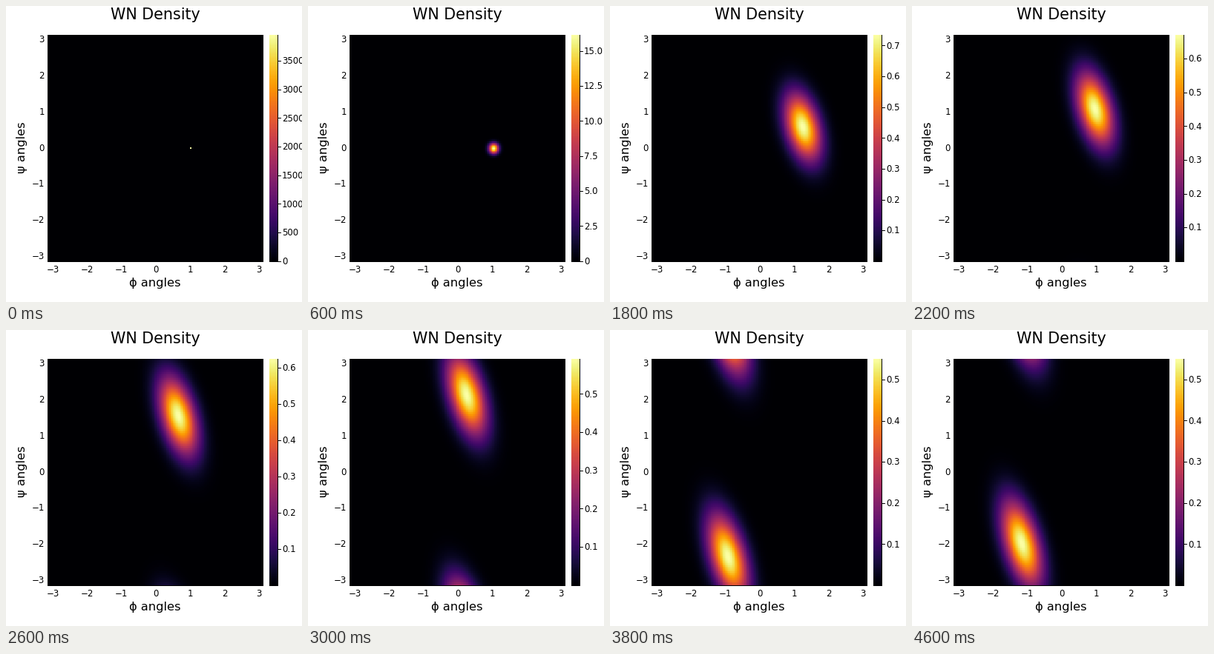
A matplotlib script that plays this animation: 399x400 px, repeating every 5600 ms.

```python
import numpy as np
import matplotlib.pyplot as plt
from matplotlib.animation import FuncAnimation

W, H, DPI = 399, 400, 100
STEPS, FRAMES, INTERVAL = 24, 28, 200
PI = np.pi

# pixel geometry
X0, X1, Y0, Y1 = 56, 347, 39, 346
BAR0, BAR1 = 355, 367
CX, CY = 202, 191.6
UX, UY = 46.2, 48.9

# key poses: step, mean phi, mean psi, peak density
STEP, PHI, PSI, PEAK = np.transpose([
    (0, 1.026, 0.0158, 3968),
    (3, 1.06, 0.0, 16.2),
    (5, 1.33, 0.05, 1.48),
    (7, 1.42, 0.22, 0.856),
    (11, 0.98, 1.09, 0.673),
    (15, 0.27, 2.15, 0.594),
    (19, -0.92, 3.94, 0.5526),
    (23, -1.16, 4.31, 0.5524),
])

grid = np.linspace(-PI, PI, 200)
gx, gy = np.meshgrid(grid, grid)


def ease(n, values):
    """Monotone cubic through the key poses, at rest at both ends."""
    gap = np.diff(STEP)
    d = np.diff(values) / gap
    a, b = d[:-1], d[1:]
    slope = np.zeros(len(values))
    same = a * b > 0
    slope[1:-1][same] = 2 * a[same] * b[same] / (a + b)[same]
    i = min(np.searchsorted(STEP, n, side="right") - 1, len(gap) - 1)
    h = gap[i]
    t = (n - STEP[i]) / h
    s = t * t * (3 - 2 * t)
    return (values[i] * (1 - s) + values[i + 1] * s
            + h * t * (1 - t) * ((1 - t) * slope[i] - t * slope[i + 1]))


def peak(n):
    return np.exp(ease(n, np.log(PEAK)))


def density(n):
    """Wrapped bivariate normal, scaled so that its maximum is one."""
    mx, my = ease(n, PHI), ease(n, PSI)
    stretch = 1 - np.exp(-max(n - 3, 0) / 4.5)
    ratio, rho = 1 + stretch, -stretch / 2
    c = 1 - rho ** 2
    sx = (2 * PI * peak(n) * ratio * np.sqrt(c)) ** -0.5
    sy = ratio * sx
    z = np.zeros_like(gx)
    for i in (-1, 0, 1):
        for j in (-1, 0, 1):
            u = (gx - mx + 2 * PI * i) / sx
            v = (gy - my + 2 * PI * j) / sy
            z += np.exp(-(u * u - 2 * rho * u * v + v * v) / (2 * c))
    return z / z.max()


def tick_step(top):
    steps = [m * 10.0 ** e for e in range(-2, 4) for m in (1, 2.5, 5)]
    return max(s for s in steps if top / s >= 5)


def tick_label(value, step):
    if value == 0:
        return "0"
    digits = next(d for d in range(4) if abs(step - round(step, d)) < 1e-9)
    return f"{value:.{digits}f}"


plt.rcParams["font.family"] = "DejaVu Sans"
fig = plt.figure(figsize=(W / DPI, H / DPI), dpi=DPI, facecolor="white")
ax = fig.add_axes([0, 0, 1, 1])
ax.axis("off")


def text(x, y, s, px, ha="center", **kw):
    return ax.text(x, y, s, fontsize=px * 72 / DPI, ha=ha, va="baseline",
                   color="black", **kw)


def line(x, y):
    return ax.plot(x, y, color="black", lw=0.72, solid_capstyle="butt", snap=False)[0]


def image(data, left, right):
    return ax.imshow(data, cmap="inferno", vmin=0, vmax=1, origin="lower",
                     extent=(left, right, Y1, Y0), interpolation="nearest",
                     aspect="auto")


heat = image(np.zeros_like(gx), X0, X1)
image(np.linspace(0, 1, 256)[:, None], BAR0, BAR1)
ax.set_xlim(0, W)
ax.set_ylim(H, 0)

line([X0 + 0.5] * 2, [Y0, Y1])
line([X0, X1], [Y1 - 0.5] * 2)
line([BAR1 - 0.5] * 2, [Y0, Y1])

text(CX - 0.7, 18.4, "WN Density", 20.67)
text(CX - 0.8, 378.6, "\u03d5 angles", 16.24)
text(25.6, CY, "\u03c8 angles", 16.24, rotation=90, rotation_mode="anchor")
for v in range(-3, 4):
    s = str(v).replace("-", "\u2212")
    text(CX + UX * v, 360, s, 11.81)
    text(52, CY - UY * v + 3.9, s, 11.81, ha="right")

marks = [(line([BAR1, BAR1 + 4], [0, 0]),
          text(372, 0, "", 11.81, ha="left", clip_on=True)) for _ in range(12)]


def draw(i):
    n = min(i, STEPS - 1)
    heat.set_data(density(n))
    top = peak(n)
    step = tick_step(top)
    for k, (mark, label) in enumerate(marks):
        value = k * step
        shown = value <= top and (k > 0 or n < 4)
        mark.set_visible(shown)
        label.set_visible(shown)
        if shown:
            y = Y1 - 0.7 - (Y1 - Y0) * value / top
            mark.set_ydata([np.floor(y) + 0.5] * 2)
            label.set_y(y + 3.8)
            label.set_text(tick_label(value, step))
    return [heat]


anim = FuncAnimation(fig, draw, frames=FRAMES, interval=INTERVAL,
                     init_func=lambda: draw(0), repeat=True, repeat_delay=0, blit=False)
plt.show()
```
